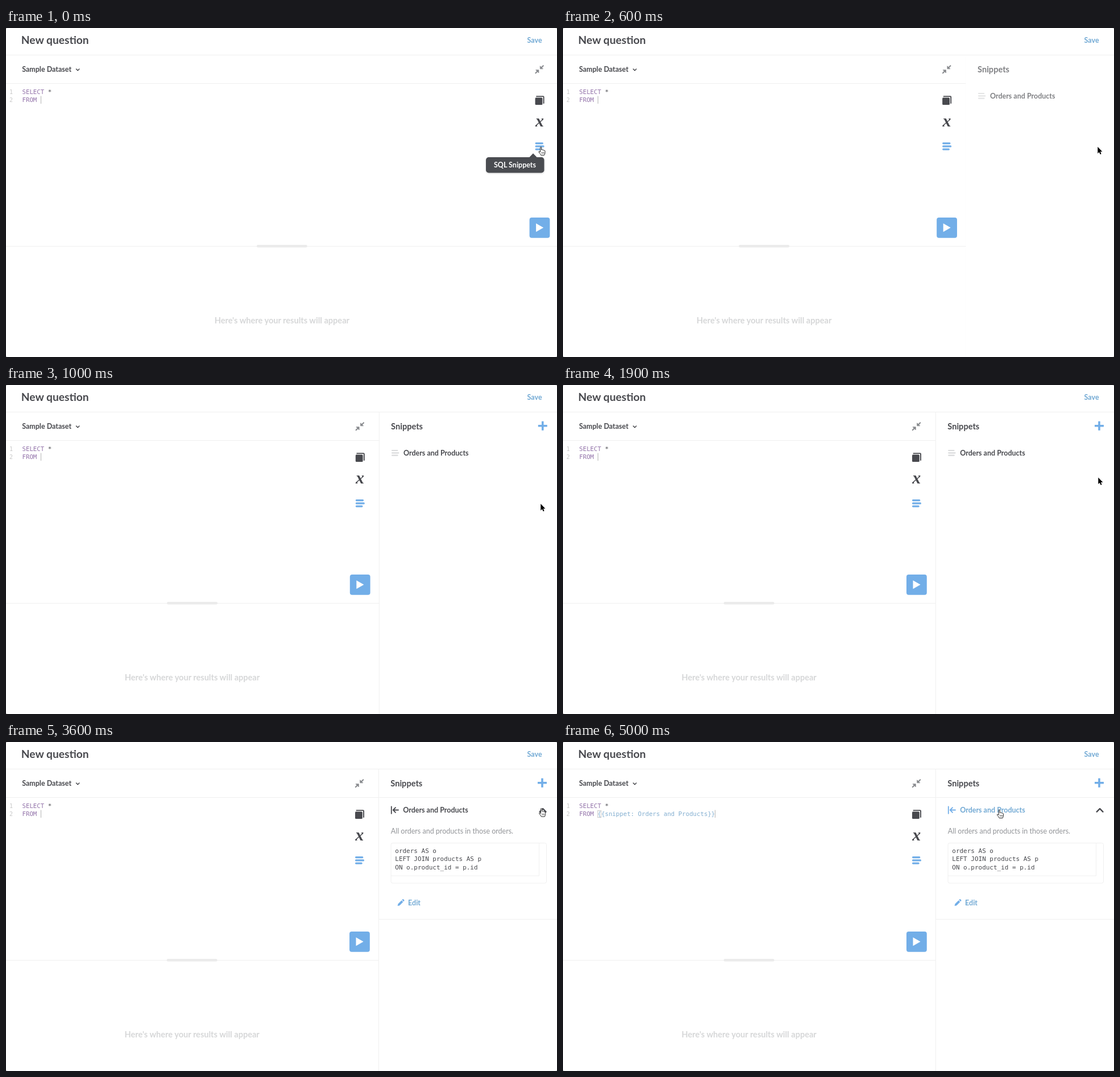
An HTML page for the animation above (5.6 s loop, 969x578 px).

```html
<!DOCTYPE html>
<html lang="en">
<head>
<meta charset="utf-8">
<title>SQL snippets</title>
<style>
  html, body { margin: 0; width: 100%; height: 100%; overflow: hidden; background: #bbb; }
  svg { display: block; width: 100%; height: 100%; }
  text { font: 700 12.5px Lato, sans-serif; fill: var(--ink); white-space: pre; }
  svg { --ink: #48494e; --blue: #72aee8; --link: #71a9d4; --line: #f0f0f0; }
  .mono { font: 10.73px "DejaVu Sans Mono", monospace; }
  .code { font-size: 10.97px; }
  .keyword { fill: #9272a9; }
  .number { font-size: 10px; fill: #c9c9c9; }
  .rule { stroke: var(--line); fill: none; }
  .stroke { fill: none; stroke-linecap: round; stroke-linejoin: round; }
  .dark { stroke: var(--ink); }
  .blue { stroke: var(--blue); }
</style>
</head>
<body>
<svg viewBox="0 0 969 578">
  <rect width="969" height="578" rx="3" fill="#fff"/>
  <text x="26.8" y="28.3" style="font-size:19.2px">New question</text>
  <text x="916.6" y="26" style="fill:var(--link)">Save</text>
  <path class="rule" d="M0 47.5H969"/>

  <text x="28.2" y="77">Sample Dataset</text>
  <path class="stroke dark" stroke-width="1.5" d="M123.5 72l2.7 2.8 2.7-2.8"/>
  <path class="rule" d="M0 97.5H969M0 383.5H969"/>

  <text class="mono number" x="6" y="115.7">1</text>
  <text class="mono number" x="6" y="130">2</text>
  <text class="mono" x="28.5" y="115.7"><tspan class="keyword">SELECT</tspan> *</text>
  <text class="mono keyword" x="28.5" y="130">FROM</text>
  <g id="inserted">
    <rect x="61" y="120.5" width="6" height="12" fill="none" stroke="#c8c8c8"/>
    <text class="mono" x="60.8" y="130" style="fill:#82aed0">{{snippet: Orders and Products}}</text>
  </g>
  <path id="caret" d="M.5 119.5V133" stroke="#b5b5b5"/>

  <g id="results">
    <rect x="-44.5" y="381" width="89" height="4.5" rx="2.2" fill="#ebebeb"/>
    <text y="518.7" text-anchor="middle" style="font-size:14.55px;fill:#d6d7d8">Here's where your results will appear</text>
  </g>

  <g id="tools">
    <g fill="#898b8f" stroke="#898b8f">
      <path d="M.9 66.8V71.8H5.9ZM-6.7 73.7H-1.5V78.9Z" stroke-width=".8"/>
      <path d="M2 70.7l5-5M-2.6 74.8l-5 5" stroke-width="2"/>
    </g>
    <rect x="-7.8" y="122.3" width="12.8" height="12.8" rx="1.6" fill="#48494e"/>
    <path class="stroke dark" stroke-width="1.9" d="M-5.4 120.1H6.2Q7.2 120.1 7.2 121.1V132"/>
    <text y="172.7" text-anchor="middle" style="font:italic 700 30px 'Liberation Serif',serif">x</text>
    <path class="stroke blue" stroke-width="3.1" d="M-6.3 202.6H5M-6.3 207.9H6.7M-6.3 213.1H3.4"/>
    <rect x="-17.8" y="333" width="35.8" height="35.7" rx="4" fill="#72aee8"/>
    <path d="M-6.3 343.3L6.8 350.8-6.3 358.3Z" fill="#fff"/>
  </g>

  <g id="sidebar">
    <path d="M.5 48H315V577H.5Z" fill="#fff"/>
    <path id="edge" class="rule" d="M.5 48V578"/>
    <g id="sideContent">
      <text x="21.3" y="78.3" style="font-size:14.6px">Snippets</text>
      <path class="blue" stroke-width="3.6" d="M280 71.8H296M288 63.8V79.8"/>
      <path id="bars" class="stroke" stroke="#d9dadb" stroke-width="2.2" d="M23.2 115H32.5M23.2 119.3H34.6M23.2 123.6H32.8"/>
      <path id="insertIcon" class="stroke" stroke-width="1.8" d="M22.8 113.3V125.8M35 119.5H26.2M30 115.2L25.8 119.5 30 123.8"/>
      <text id="title" x="43.2" y="124.2">Orders and Products</text>
      <path id="chevron" class="stroke dark" stroke-width="2.4"/>
      <g id="details">
        <path class="rule" d="M1 97.5H314M1 311.5H314"/>
        <text x="21.8" y="161" style="font-weight:400;fill:#929498">All orders and products in those orders.</text>
        <rect class="rule" x="22" y="177.5" width="273.5" height="70.5" rx="3"/>
        <path class="rule" d="M22 235H282.5V177.5"/>
        <text class="mono code" x="29.3" y="195">orders AS o</text>
        <text class="mono code" x="29.3" y="209.4">LEFT JOIN products AS p</text>
        <text class="mono code" x="29.3" y="223.7">ON o.product_id = p.id</text>
        <path d="M33.6 288l.8-3.6 6.2-6.2 2.8 2.8-6.2 6.2ZM41.4 277.4l1.1-1.1q.7-.6 1.4 0l1.4 1.4q.6.7 0 1.4l-1.1 1.1Z" fill="#72aee8"/>
        <text x="52.1" y="286.6" style="fill:var(--link)">Edit</text>
      </g>
    </g>
  </g>

  <g id="tooltip">
    <rect x="843" y="227" width="105" height="30" rx="6" fill="#000" opacity=".06"/>
    <path d="M919.5 228L927 220.3 934.5 228Z" fill="#4a4c51"/>
    <rect x="844" y="227" width="102.5" height="27.5" rx="5" fill="#4a4c51"/>
    <text x="895" y="245" text-anchor="middle" style="fill:#fff">SQL Snippets</text>
  </g>

  <path id="arrow" d="M0 0V11.6L2.6 9.2 4.4 13.3 6.3 12.5 4.6 8.4H8.1Z" fill="#000" stroke="#fff" stroke-width=".8" paint-order="stroke"/>
  <g id="hand" stroke="#222" stroke-linejoin="round">
    <path d="M-.6 1.2a1.05 1.05 0 0 1 2.1 0V5.2q1.8-.9 2.2.5 1.7-.8 2.1.6 1.9-.5 1.9 1.3V10q0 2.2-1.4 4.6H.4Q-.5 12.6-2.2 10.6-3.6 9-3.3 8.3-2.3 7.4-.6 9.2Z" fill="#fff"/>
    <path d="M1.9 9.2V12M3.8 9.2V12M5.6 9.2V12" stroke-width=".7"/>
  </g>
</svg>
<script>
const LOOP = 5600, TICK = 100;
const OPEN_SIDEBAR = 400, EXPAND = 3000, INSERT = 4800;
const part = Object.fromEntries([...document.querySelectorAll('[id]')].map(el => [el.id, el]));

const show = (el, visible) => el.setAttribute('display', visible ? 'inline' : 'none');
const move = (el, x, y = 0) => el.setAttribute('transform', `translate(${x} ${y})`);
const mix = (a, b, u) => a + (b - a) * u;
const smooth = u => u * u * (3 - 2 * u);

// Critically damped spring that settles by 1200 ms.
function slide(t) {
  if (t < OPEN_SIDEBAR) return 0;
  if (t >= 1200) return 1;
  const x = .0125 * (t - 342);
  return 1 - (1 + x) * Math.exp(-x);
}

function pointer(t) {
  if (t < 1900) return [940.3, 208.8];
  if (t < 2400) return [941.3, 116.5 + 46 * .25 ** ((t - 1900) / 100)];
  const u = smooth(Math.min(1, Math.max(0, (t - 3900) / 600)));
  return [mix(941, 766.8, u), mix(116.5, 119, u)];
}

function draw(t) {
  const p = slide(t);
  const [x, y] = pointer(t);
  const onRow = y < 130;
  const onTitle = onRow && x < 813;
  const expanded = t >= EXPAND;
  const inserted = t >= INSERT;

  move(part.sidebar, 969 - 314 * p);
  move(part.tools, 938.4 - 316.6 * p);
  move(part.results, 485.3 - 158.2 * p);
  show(part.sidebar, p > 0);
  part.sideContent.setAttribute('opacity', p * p);
  part.edge.setAttribute('opacity', p ** 8);
  show(part.tooltip, t < OPEN_SIDEBAR);

  show(part.bars, !onRow);
  show(part.insertIcon, onRow);
  show(part.chevron, onRow);
  part.insertIcon.style.stroke = onTitle ? 'var(--blue)' : 'var(--ink)';
  part.title.style.fill = onTitle ? 'var(--link)' : 'var(--ink)';
  part.chevron.setAttribute('d', expanded
    ? 'M283.7 122.6l5.4-5.4 5.4 5.4'
    : 'M283.7 117.2l5.4 5.4 5.4-5.4');
  show(part.details, expanded);

  show(part.inserted, inserted);
  move(part.caret, inserted ? 267 : 61);

  const overLink = t < OPEN_SIDEBAR || onTitle || (onRow && x > 930);
  show(part.hand, overLink);
  show(part.arrow, !overLink);
  move(part.hand, x, y);
  move(part.arrow, x, y);
}

const start = performance.now();
function frame() {
  const t = (performance.now() - start) % LOOP;
  draw(Math.floor(t / TICK) * TICK);
  requestAnimationFrame(frame);
}
frame();
</script>
</body>
</html>
```
